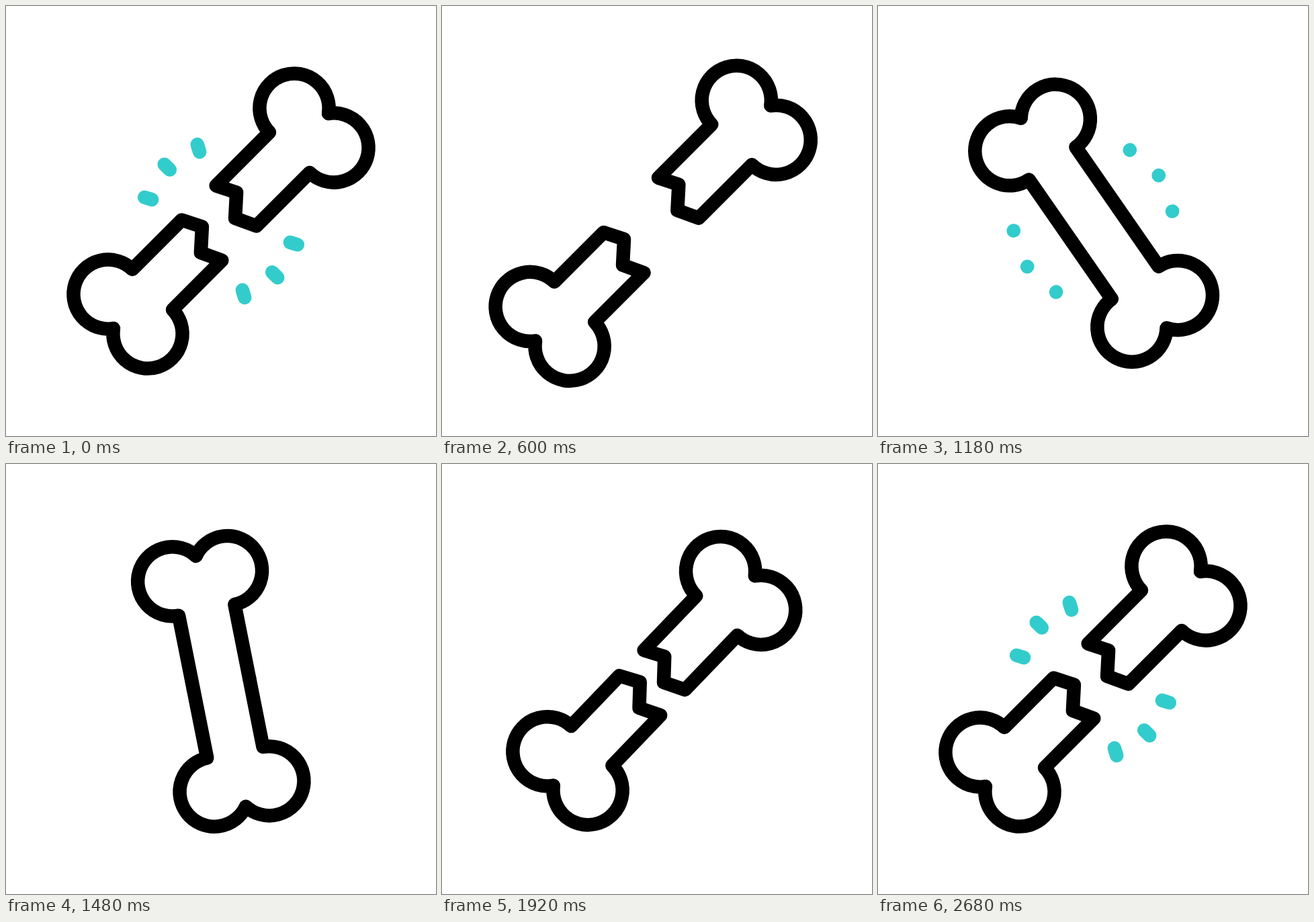
These frames come from a looping animation (640x640 px, 3.6 s). An HTML page with a canvas:

```html
<!DOCTYPE html>
<html lang="en">
<head>
<meta charset="utf-8">
<title>Broken bone</title>
<style>
  html, body { margin: 0; height: 100%; overflow: hidden; background: #fff; }
  canvas { display: block; width: 100vmin; height: 100vmin; }
</style>
</head>
<body>
<canvas id="stage" width="640" height="640"></canvas>
<script>
const SIZE = 640, LOOP = 3600, ACTIVE = 2680;
const JOIN = 940, BREAK = ACTIVE - JOIN;
const ctx = document.getElementById('stage').getContext('2d');

// All shapes are relative to the center of the joined bone.
const crack = [[-33, -27], [-2.5, -17], [-4.5, 21.5], [27, 33]];
const upper = makeHalf(1, crack);
const lower = makeHalf(-1, [...crack].reverse());

// The two ends mirror each other through the center; the crack is shared.
function makeHalf(side, [start, second, third, end]) {
  const lobe = (x, y) => `A51.6 51.6 0 1 1 ${side * x} ${side * y}`;
  const outline = `M${start}L${side * 46.4} ${side * -106.4}`
    + lobe(134.4, -134.4) + lobe(106.4, -46.4) + `L${end}`;
  return { side, open: new Path2D(outline), closed: new Path2D(`${outline}L${third}L${second}Z`) };
}

// Eased progress from 0 to 1 between two times.
function ramp(t, from, to) {
  const u = Math.min(1, Math.max(0, (t - from) / (to - from)));
  return u * u * (3 - 2 * u);
}

// The halves pull apart and join, then do the same backwards.
function drawBone(t) {
  const phase = Math.min(t, ACTIVE - t);
  const pull = ramp(phase, 0, 540), join = ramp(phase, 540, JOIN);
  const spread = 25.6 + 17.8 * pull - 43.4 * join;
  const drift = pull - 0.52 * join;
  const whole = t >= JOIN && t <= BREAK;
  for (const half of [upper, lower]) {
    const shift = half.side * spread;
    ctx.save();
    ctx.translate(shift - 6 * drift, 3.5 * drift - shift);
    ctx.stroke(whole ? half.open : half.closed);
    ctx.restore();
  }
}

// Visible part of a spark: 0 is its inner end, 1 its outer end.
function sparkSpan(t) {
  if (t < 800) return [ramp(t, 0, 190), 1];
  if (t < 2000) return [ramp(t, 1010, 1200), ramp(t, 820, 1010)];
  return [0, ramp(t, 2080, 2270)];
}

function drawSparks(t) {
  const [tail, head] = sparkSpan(t);
  if (head <= tail) return;
  ctx.beginPath();
  for (const middle of [45, 225]) {
    for (const turn of [-27.8, 0, 27.8]) {
      const angle = (middle + turn) * Math.PI / 180;
      const at = k => [Math.cos, Math.sin].map(f => f(angle) * (107.7 + 11.5 * k));
      ctx.moveTo(...at(tail));
      ctx.lineTo(...at(head));
    }
  }
  ctx.stroke();
}

function draw(t) {
  const degrees = -80.2 * (ramp(t, 762, 1200) - ramp(t, 1200, 1976));
  ctx.fillStyle = '#fff';
  ctx.fillRect(0, 0, SIZE, SIZE);
  ctx.save();
  ctx.translate(SIZE / 2, SIZE / 2);
  ctx.rotate(degrees * Math.PI / 180);
  ctx.lineWidth = 20.5;
  ctx.lineCap = ctx.lineJoin = 'round';
  ctx.strokeStyle = '#33cccc';
  drawSparks(t);
  ctx.strokeStyle = '#000';
  drawBone(t);
  ctx.restore();
}

const start = performance.now();
function tick() {
  draw(Math.min((performance.now() - start) % LOOP, ACTIVE));
  requestAnimationFrame(tick);
}
tick();
</script>
</body>
</html>
```
